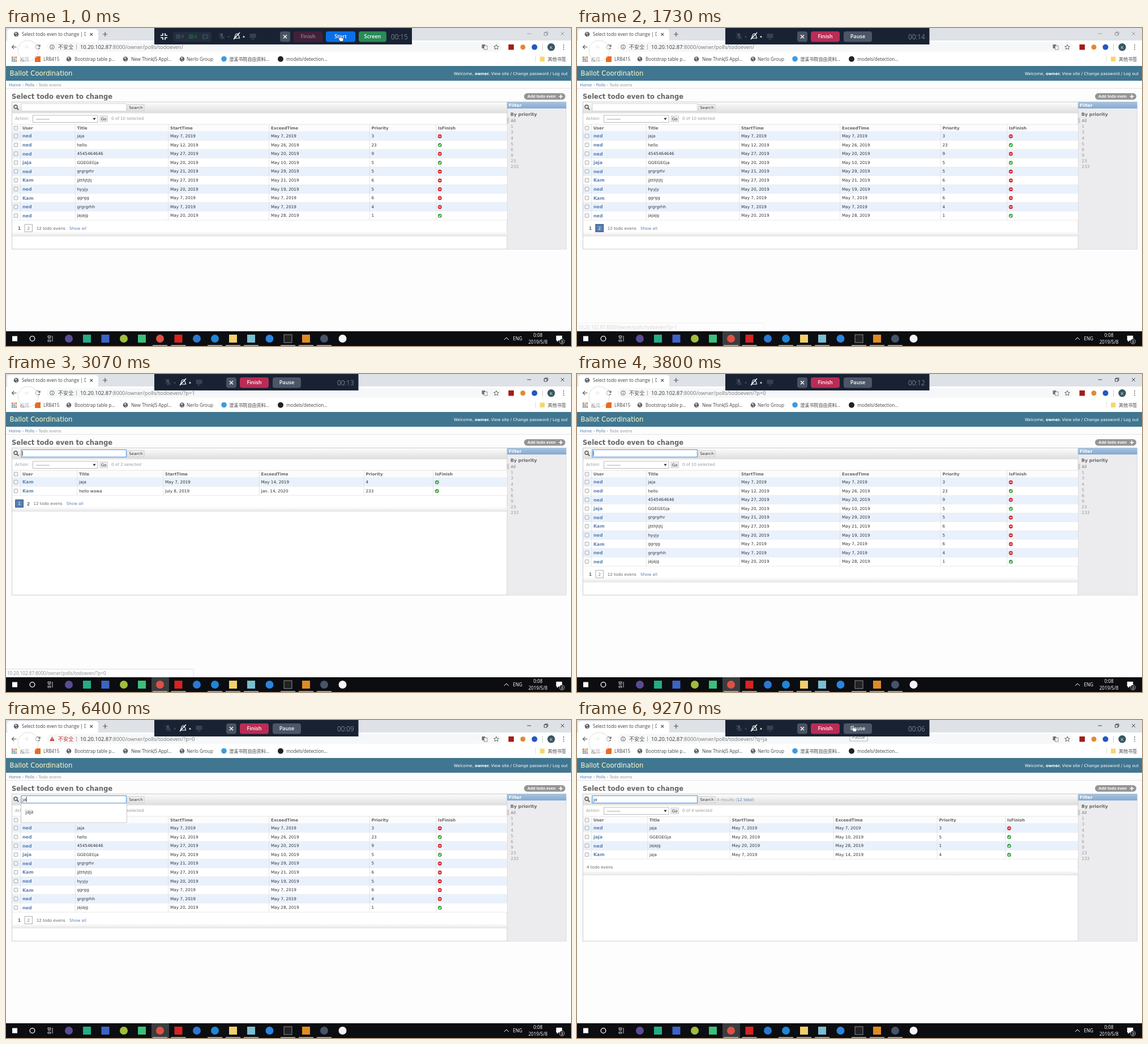
These frames come from a looping animation (998x561 px, 9.34 s). An HTML page:

```html
<!DOCTYPE html>
<html lang="en">
<head>
<meta charset="utf-8">
<title>Todo list screencast</title>
<style>
html, body { margin: 0; width: 100%; height: 100%; overflow: hidden; background: #fdfdfd; }
svg { display: block; width: 998px; height: 561px; }
text { white-space: pre; }
.d { font-family: "DejaVu Sans", sans-serif; }
.o { font-family: "Open Sans", "Noto Sans CJK SC", "Noto Sans CJK", sans-serif; }
.l { font-family: "Liberation Sans", sans-serif; }
.b { font-weight: bold; }
.m { font-weight: 600; }
.t { font-weight: 300; }
</style>
</head>
<body>
<svg id="stage" viewBox="0 0 998 561"></svg>
<script>
const LOOP = 9340;
const START = 700, ACTIVE = 1400, HOVER2 = 1640, PAGE2 = 2070, HOVER1 = 2700,
      PAGE1 = 3500, KEY1 = 5850, KEY2 = 6150, RESULTS = 6700, RETURN = 8700, TIP = 9100;

const rect = (x, y, w, h, fill, more = '') =>
  `<rect x="${x}" y="${y}" width="${w}" height="${h}" fill="${fill}" ${more}/>`;
const circle = (x, y, r, fill, more = '') => `<circle cx="${x}" cy="${y}" r="${r}" fill="${fill}" ${more}/>`;
const path = (d, stroke, w = 1, fill = 'none', more = '') =>
  `<path d="${d}" stroke="${stroke}" stroke-width="${w}" fill="${fill}" ${more}/>`;
const text = (x, y, s, size, fill, cls = 'd', more = '') =>
  `<text x="${x}" y="${y}" font-size="${size}" fill="${fill}" class="${cls}" ${more}>${s}</text>`;
const group = (id, body, more = '') => `<g id="${id}" ${more}>${body}</g>`;
const shade = (id, a, b) => `<linearGradient id="${id}" x2="0" y2="1"><stop stop-color="${a}"/>` +
  `<stop offset="1" stop-color="${b}"/></linearGradient>`;
const MID = 'text-anchor="middle"';
const LINK = '#5b80b2', GREY = '#999', DARK = '#555';

const globe = x => circle(x, 0, 4.3, '#5f6368') +
  path(`M${x - 2.5} -2l2 -1 2 1.5 -2 1.5z M${x - .5} 1.5l2.5 .3 -1.5 1.7z`, 'none', 0, '#eee');

function browser() {
  let s = rect(0, 0, 998, 22, '#dee1e6') + rect(2, 2, 161, 22, '#fff', 'rx="5"') + rect(0, 22, 998, 45, '#fff') +
    `<g transform="translate(0 11)">${globe(18)}</g>` +
    text(28, 14, 'Select todo even to change | D', 8.1, '#444', 'o', 'clip-path="url(#tab)"') +
    path('M148.500 9l4.500 4.500m0 -4.500l-4.500 4.500', DARK, 1.1) + path('M171 11h8m-4 -4v8', DARK, 1.2) +
    group('controls', path('M920.500 10h7M950.500 8.500h5v4.500h-5zM952 8.500v-1.500h5v4.500h-1.500M980 7l6 6m0 -6l-6 6', '#333', .9));
  s += path('M18.500 33.500h-8m3.700 -3.700l-3.700 3.700 3.700 3.700', DARK, 1.2) +
    path('M31 33.500h8m-3.700 -3.700l3.700 3.700 -3.700 3.700', '#ccc', 1.2) +
    path('M59 31.200a3.700 3.700 0 1 0 .6 3.300M60 29.500v2.800h-2.800', DARK, 1.2) +
    rect(72, 25, 804, 17, '#f6f7f8', 'rx="8.5"');
  s += group('safe', circle(81.500, 33.500, 3.800, 'none', `stroke="${DARK}" stroke-width=".9"`) +
      path('M81.500 33v2.600M81.500 31v1', DARK, 1) + text(92, 37, '不安全', 9.1, DARK, 'o')) +
    group('unsafe', path('M81.500 29.300l4.200 7.800h-8.400z', 'none', 0, '#c5332b') +
      path('M81.500 32v2.500M81.500 35.200v1', '#fff', .9) + text(92, 37, '不安全', 9.1, '#c5332b', 'o')) +
    path('M124.500 29v9', '#999', .8) +
    `<text x="131" y="36.800" font-size="9.350" class="o" fill="#333">10.20.102.87<tspan fill="#777">:8000/owner/polls/todoeven/<tspan id="query"></tspan></tspan></text>`;
  s += rect(840.5, 29, 6, 7, '#777', 'rx="1"') + rect(844.5, 31.5, 5.5, 6.500, '#fff', 'stroke="#777" stroke-width=".8"') +
    path('M866 29.300l1.300 2.900 3.100 .300 -2.300 2.100 .700 3.100 -2.800 -1.700 -2.800 1.700 .700 -3.100 -2.300 -2.100 3.100 -.300z', DARK, .9) +
    rect(887.500, 29, 9.500, 9.500, '#a51c16') + circle(913, 33.700, 4.500, '#e08a35') + circle(933.500, 33.700, 5, '#2457c5') +
    path('M947.500 28v12', '#ccc') + circle(963, 33.700, 6.700, '#37565f') + text(963, 36.500, 'K', 7.500, '#fff', 'o', MID) +
    [30, 33.700, 37.400].map(y => circle(985, y, .9, DARK)).join('');
  const dots = ['#d94a3a', '#e9a32b', '#3c9c55', '#3c78d8'];
  for (let i = 0; i < 9; i++) s += rect(10 + i % 3 * 3.300, 50.500 + (i / 3 | 0) * 3.300, 2.300, 2.300, dots[i % 4]);
  s += text(25, 58.200, '应用', 8.1, '#444', 'o') + rect(51, 50, 10, 10, '#ea6a20') +
    `<g transform="translate(0 54.700)">${[111, 211, 311].map(globe).join('')}</g>` +
    circle(385, 54.500, 4.800, '#3f9be0') + circle(485, 54.700, 5, '#222') + rect(943, 50.500, 8.500, 8.500, '#f6d76b', 'rx="1"') +
    path('M935.500 49v11', '#ddd') +
    [[66, 'LRB415'], [121, 'Bootstrap table p...'], [221, 'New ThinkJS Appl...'], [319, 'Nerlo Group'],
     [394, '澄溪书院自由资料...'], [495, 'models/detection...'], [957, '其他书签']]
      .map(([x, s]) => text(x, 57.700, s, 8.1, '#444', 'o')).join('');
  return s + circle(39, 40, 18, '#fff', 'fill-opacity=".6" stroke="#ddd"');
}

function frame() {
  let s = rect(0, 67, 998, 468, '#fdfdfd') + rect(0, 67, 998, 26, '#417690') +
    text(6.500, 84.200, 'Ballot Coordination', 11.600, '#ffc') +
    text(992, 83, 'Welcome, <tspan class="b">owner.</tspan> View site / Change password / Log out', 7.1, '#fff', 'd', 'text-anchor="end"') +
    text(5, 102.500, `Home <tspan fill="${GREY}">›</tspan> Polls <tspan fill="${GREY}">› Todo evens</tspan>`, 7.200, LINK) +
    path('M0 106.500h998', '#ddd', .8) +
    text(10, 124.500, 'Select todo even to change', 11.550, '#666', 'd b') +
    rect(915, 115, 73, 11.500, '#959595', 'rx="5.700"') + text(921, 123.300, 'Add todo even', 7.200, '#fff', 'l b') +
    path('M976.500 120.700h7m-3.500 -3.500v7', '#fff', 1.600);
  s += rect(10.500, 130.500, 979, 259.500, '#fff', 'stroke="#ccc"') + rect(11, 131, 874, 19, 'url(#bar)') +
    path('M10 150h875', '#ddd', .8) +
    circle(17, 139, 3, 'none', 'stroke="#555" stroke-width="1.400"') + path('M19.200 141.200l3 3.200', '#555', 1.700) +
    rect(27, 133.500, 185.500, 13, '#fff', 'id="field"') + button(215, 135, 29, 11, 'Search') +
    text(16, 162.400, 'Action:', 7.200, GREY) + rect(47.500, 154, 114.500, 12.500, '#fff', 'stroke="#aaa" stroke-width=".8"') +
    text(53, 163, '---------', 7.300, '#333') + path('M153.300 158.800h5.400l-2.700 3.600z', 'none', 0, '#333') +
    button(166, 155, 13.500, 10.500, 'Go');
  s += rect(885, 130, 104.500, 260, '#ececef') + rect(885, 130, 104.500, 12, 'url(#blue)') + path('M885 130v260', '#ccc', .8) +
    text(888, 139, 'Filter', 7.500, '#fff', 'd b') + text(891, 155, 'By priority', 7.850, '#666', 'd b') +
    rect(885, 158.500, 3.500, 9.500, '#ccc') +
    ['All', 1, 3, 4, 5, 6, 9, 23, 233].map((v, i) => text(891.500, 166.200 + i * 10.130, v, 7.300, i ? GREY : '#777')).join('');
  return s;
}

const button = (x, y, w, h, s) => rect(x, y, w, h, '#efefef', 'stroke="#bbb" stroke-width=".7"') +
  text(x + w / 2, y + h / 2 + 2.600, s, 7.150, '#333', 'd', MID);
const box = (x, y) => rect(x - 3.300, y - 3.300, 6.600, 6.600, '#f4f4f4', 'rx="1" stroke="#999" stroke-width=".8"');
const mark = (x, y, ok) => circle(x, y, 3.500, ok ? '#3ea345' : '#d7262b') +
  path(ok ? `M${x - 1.700} ${y}l1.300 1.400 2.100 -2.700` : `M${x - 2} ${y}h4`, '#fff', 1.200);

const HEADS = ['User', 'Title', 'StartTime', 'ExceedTime', 'Priority', 'IsFinish'];
const date = s => s.includes(',') ? s : s + ', 2019';

function table(id, xs, rows, count, footer) {
  const end = 183 + rows.length * 15.600;
  let s = text(186, 162.400, `0 of ${count} selected`, 7.150, GREY) +
    rect(11, 170, 874, 13, '#fcfcfc') + path('M11 170h874M11 183h874', '#ddd', .8) + box(17.500, 176.700) +
    HEADS.map((h, i) => text(xs[i], 179.200, h, 7.150, '#666', 'd b')).join('');
  rows.forEach((row, i) => {
    const y = 183 + i * 15.600, c = y + 7.600, v = row.split('|');
    s += rect(11, y, 874, 15.600, i % 2 ? '#fff' : '#e9f1fc') + path(`M11 ${y + 15.600}h874`, '#e4e4e4', .8) + box(17.500, c) +
      text(xs[0], c + 2.700, v[0], 7.900, LINK, 'd b') + text(xs[1], c + 2.400, v[1], 7.250, '#333') +
      text(xs[2], c + 2.400, date(v[2]), 7.250, '#333') + text(xs[3], c + 2.400, date(v[3]), 7.250, '#333') +
      text(xs[4], c + 2.400, v[4], 7.250, '#333') + mark(xs[5] + 3.300, c + .3, +v[5]);
  });
  s += path(xs.map(x => `M${x - 3.300} 170V${end}`).join(''), '#ddd', .8) +
    rect(11, end + 20, 874, 8, 'url(#foot)') + path(`M11 ${end + 28}h874`, '#ddd', .8);
  return group(id, s + footer);
}
const page = (id, x, y, n) => group(id, rect(x, y, 13.500, 13, '#fff', 'stroke="#bbb" stroke-width="1.200"') +
  text(x + 6.750, y + 9.200, n, 7.300, LINK, 'd', MID));
const total = (x, y) => text(x, y, '12 todo evens', 7.150, '#666') + text(x + 58.300, y, 'Show all', 7.150, LINK);

const ALL = ['ned|jaja|May 7|May 7|3|0', 'ned|hello|May 12|May 26|23|1', 'ned|4545464646|May 27|May 20|9|0',
  'jaja|GGEGEGja|May 20|May 10|5|1', 'ned|grgrgrhr|May 21|May 29|5|0', 'Kam|jjtthjtjtj|May 27|May 21|6|0',
  'ned|hyyjy|May 20|May 19|5|0', 'Kam|ggrgg|May 7|May 7|6|0', 'ned|grgrgrhh|May 7|May 7|4|0', 'ned|jajajg|May 20|May 28|1|1'];
const LAST = ['Kam|jaja|May 7|May 14|4|1', 'Kam|hello wawa|July 8|Jan. 14, 2020|233|1'];

function tables() {
  return table('first', [29, 125.500, 290, 468, 645.500, 763], ALL, 10,
      text(20.800, 356, 1, 7.800, '#666', 'd b') + page('to2', 33, 346.500, 2) + total(53.700, 355.700)) +
    table('second', [29, 129, 281, 450.500, 635.500, 758], LAST, 2,
      page('to1', 16.800, 222, 1) + text(36.700, 231.500, 2, 7.800, '#666', 'd b') + total(48.500, 231.200)) +
    table('found', [29, 128, 273.500, 456.500, 639.500, 760], [ALL[0], ALL[3], ALL[9], LAST[0]], 4,
      text(17, 262.200, '4 todo evens', 7.150, '#666') +
      text(247, 142.700, `4 results (<tspan fill="${LINK}">12 total</tspan>)`, 7.150, GREY));
}

function taskbar() {
  let s = rect(0, 535, 998, 26, '#0c0d10') + rect(257, 535, 31, 26, '#3b3c3e', 'id="active"') +
    rect(11, 543.500, 9, 9, '#fff') + circle(46.500, 548, 4.300, 'none', 'stroke="#fff" stroke-width="1.300"') +
    path('M74 543h5v2.500h-5zM74 550.500h5v2.500h-5zM74 547.500h5M82 543v10', '#ddd', .9);
  const apps = [[111, '#5b4b96', 1], [143, '#23ac86'], [175.500, '#3c63c8'], [208, '#a0bd3b', 1], [240, '#3bbf7b'], [272, '#dd5144', 1],
    [304.500, '#d8231f'], [337, '#2b78d4', 1], [369, '#1e86d6', 1], [401, '#f2d06b'], [433, '#79bfd0'], [465.500, '#2b84e0', 1],
    [498, '#222'], [530, '#e08a25'], [562, '#46546a', 1], [594.500, '#f4f4f4', 1]];
  for (const [x, c, round] of apps)
    s += round ? circle(x, 548, 7, c) : rect(x - 7, 541, 14, 14, c, x == 498 ? 'stroke="#aaa" stroke-width=".8"' : '');
  for (const x of [272, 304.500, 369, 401, 433, 498, 530, 562]) s += rect(x - 13, 559.300, 26, 1.700, '#78b8e8');
  return s + path('M880 550l4 -4 4 4', '#fff', 1) + text(895.500, 551, 'ENG', 8.1, '#fff', 'o') +
    text(939.500, 545, '0:08', 8.1, '#fff', 'o', MID) + text(939.500, 557, '2019/5/8', 8.1, '#fff', 'o', MID) +
    path('M972 543h10v8h-6l-2.500 2.500v-2.500h-1.500z', '#fff', .5, '#fff') + circle(982, 553, 4.500, '#222', 'stroke="#ccc" stroke-width=".7"') +
    text(982, 555.600, 3, 7, '#fff', 'o', MID);
}

const pill = (x, w, s, fill, color = '#fff') => rect(x, 6, w, 18.500, fill, 'rx="4"') +
  text(x + w / 2, 18.300, s, 9.200, color, 'o m', MID);
const devices = x => // microphone, bell, monitor
  rect(x - 2, 9, 4, 7, '#46505f', 'rx="2"') + path(`M${x - 4} 14a4 4 0 0 0 8 0M${x} 18v2M${x - 5} 9l10 11`, '#46505f', 1.100) +
  path(`M${x + 10} 16.500l2 -3 2 3z`, 'none', 0, '#46505f') +
  path(`M${x + 22} 18c2 -1 1 -8 5 -8s3 7 5 8z`, '#fff', 1.200) + path(`M${x + 21} 20l11 -12`, '#fff', 1.500) +
  path(`M${x + 37} 16.500l2 -3 2 3z`, 'none', 0, '#fff') +
  rect(x + 49.500, 10, 11, 7.500, '#364252') + path(`M${x + 55} 17v3m-3 0h6`, '#364252', 1.200);
const cross = x => rect(x, 6, 18, 18.500, '#4a5362', 'rx="4"') + path(`M${x + 6} 12.200l6 6m0 -6l-6 6`, '#fff', 1.400);

function recorder() {
  const idle = rect(262, 0, 455, 29, '#192233') +
    path('M277 9v4h-4M281 9v4h4M277 21v-4h-4M281 21v-4h4', '#fff', 1.600) +
    rect(295, 7, 68, 17, '#222e3e', 'rx="3"') +
    path('M300 11h8v8h-8zM309 14l5 -3v8l-5 -3z', 'none', 0, '#344354') +
    path('M323 11h8v8h-8zM332 14l5 -3v8l-5 -3z', 'none', 0, '#24503f') +
    rect(346.500, 11, 11, 8.500, '#344354', 'rx="1"') + circle(352, 15.200, 2.300, '#222e3e') + devices(381) + cross(484) +
    pill(508, 51, 'Finish', '#43203a', '#8d8791') + pill(565, 52, 'Start', '#0a70e8') + pill(623, 49, 'Screen', '#298b58') +
    text(680, 19.500, '00:15', 11.800, '#a9b0ba', 'o t');
  const live = rect(262, 0, 360.500, 29, '#192233') + devices(286) + cross(389) + pill(413, 51, 'Finish', '#b92c56') +
    pill(471, 50, 'Pause', '#4b5666') + `<text id="clock" x="585" y="19.500" font-size="11.800" fill="#a9b0ba" class="o t"></text>`;
  return group('tip', rect(482, 22, 31, 15, '#fff', 'stroke="#999" stroke-width=".8"') + text(486, 32.500, 'Pause', 8.1, '#555', 'o')) +
    group('idle', idle) + group('live', live);
}

const hand = path('M-2 -5c0 -1.300 1.800 -1.300 1.800 0v4l4 1c1.200 .300 1.400 1 1.200 2l-.800 3.500h-5l-3 -4.500c-.500 -1 .700 -1.500 1.800 -.300z', '#333', .6, '#fff');

document.getElementById('stage').innerHTML =
  `<defs>${shade('bar', '#fcfcfc', '#dededf')}${shade('foot', '#fff', '#e8e8ea')}${shade('blue', '#a9c4de', '#86aad0')}` +
  `<clipPath id="tab"><rect width="141" height="22"/></clipPath></defs>` +
  browser() + frame() + tables() + text(29, 142.800, '', 8, '#222', 'o', 'id="typed"') +
  rect(29, 135.500, .9, 9, '#111', 'id="caret"') +
  group('suggest', rect(26.500, 147, 187, 34, '#fff', 'rx="2" stroke="#bbb" stroke-width=".8"') + text(34.500, 165.300, 'jaja', 8.500, '#333', 'o')) +
  group('status', rect(-1, 520.500, 332, 15, '#fff', 'stroke="#ddd" rx="2"') +
    `<text id="target" x="2" y="530.800" font-size="8.050" fill="#888" class="o"></text>`) +
  taskbar() + recorder() + group('hand', hand);

const el = {};
document.querySelectorAll('svg [id]').forEach(e => el[e.id] = e);
const show = (id, on) => el[id].style.display = on ? '' : 'none';
const write = (id, s) => { if (el[id].textContent !== s) el[id].textContent = s; };
const within = (t, a, b) => t >= a && t < b;
const clamp = v => Math.max(0, Math.min(1, v));

function highlight(id, on) {
  const [r, label] = el[id].children;
  r.setAttribute('fill', on ? '#5b80b2' : '#fff');
  r.setAttribute('stroke', on ? '#36537f' : '#bbb');
  label.setAttribute('fill', on ? '#fff' : LINK);
}

function draw(t) {
  const second = within(t, PAGE2, PAGE1), found = t >= RESULTS;
  show('first', !second && !found);
  show('second', second);
  show('found', found);
  write('query', t < PAGE2 ? '' : second ? '?p=1' : found ? '?q=ja' : '?p=0');
  el.controls.setAttribute('opacity', t < PAGE2 ? .45 : 1);

  const next = within(t, HOVER2, PAGE2), prev = within(t, HOVER1, PAGE1);
  highlight('to2', next);
  highlight('to1', prev);
  show('status', next || prev);
  el.status.setAttribute('opacity', clamp((t - (next ? HOVER2 : HOVER1)) / 250));
  write('target', '10.20.102.87:8000/owner/polls/todoeven/?p=' + (next ? 1 : 0));

  const focus = t >= PAGE2, typing = within(t, KEY1, RESULTS);
  el.field.setAttribute('stroke', focus ? '#5a9be0' : '#ccc');
  el.field.setAttribute('stroke-width', focus ? 1.2 : .8);
  write('typed', t < KEY1 ? '' : t < KEY2 ? 'j' : 'ja');
  const since = t - (found ? RESULTS : t >= KEY2 ? KEY2 : typing ? KEY1 : t >= PAGE1 ? PAGE1 : PAGE2);
  show('caret', focus && since % 1000 < 500);
  el.caret.setAttribute('x', !typing ? 28.6 : t < KEY2 ? 31.2 : 35.6);
  show('suggest', typing);
  show('unsafe', typing);
  show('safe', !typing);

  show('active', t >= ACTIVE);
  show('idle', t < START);
  show('live', t >= START);
  const left = Math.min(15, 15 - Math.floor((t - 170) / 1000));
  write('clock', '00:' + String(left).padStart(2, '0'));

  show('hand', t < START || t >= RETURN);
  const k = 1 - (1 - clamp((t - RETURN) / 300)) ** 2;
  el.hand.setAttribute('transform', t < START ? 'translate(591 18)' : `translate(${462 + 27 * k} ${27 - 12 * k})`);
  show('tip', t >= TIP);
}

function tick() {
  draw(performance.now() % LOOP);
  requestAnimationFrame(tick);
}
tick();
</script>
</body>
</html>
```
